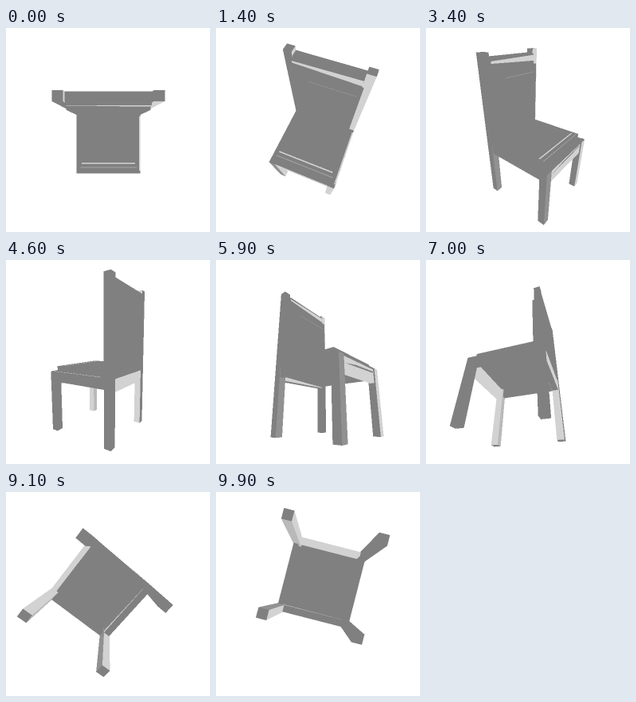
These frames come from a looping animation (256 by 256 pixels, 10000 ms). An HTML page with a canvas:

```html
<!DOCTYPE html>
<html lang="en">
<head>
<meta charset="utf-8">
<title>Chair orbit</title>
<style>
html, body { margin: 0; width: 100%; height: 100%; overflow: hidden; background: #fff; }
canvas { display: block; width: 100vw; height: 100vh; }
</style>
</head>
<body>
<canvas id="view" width="256" height="256"></canvas>
<script>
const SIZE = 256, SS = 2, W = SIZE * SS;
const STEPS = 100, STEP_MS = 100, TURNS = 4;
const DIST = 2.5, FOCAL = SIZE / 2 / Math.tan(Math.PI / 6);
const DARK = 128, SOFT = 145, MID = 185, LIGHT = 210;

const ctx = document.getElementById("view").getContext("2d");
const buffer = document.createElement("canvas");
buffer.width = buffer.height = W;
const bctx = buffer.getContext("2d");
const image = bctx.createImageData(W, W);
const pixels = new Uint32Array(image.data.buffer);
const depth = new Float32Array(W * W);

// Chair axes: x right, y up, z towards the front edge of the seat
const quads = [];
const quad = (tone, ...points) => quads.push({ tone, points });

function box([x0, x1], [y0, y1], [z0, z1], tones = {}) {
  const { left = DARK, right = DARK, top = DARK, bottom = DARK, front = DARK, rear = DARK } = tones;
  quad(left, [x0, y0, z0], [x0, y0, z1], [x0, y1, z1], [x0, y1, z0]);
  quad(right, [x1, y0, z0], [x1, y0, z1], [x1, y1, z1], [x1, y1, z0]);
  quad(bottom, [x0, y0, z0], [x1, y0, z0], [x1, y0, z1], [x0, y0, z1]);
  quad(top, [x0, y1, z0], [x1, y1, z0], [x1, y1, z1], [x0, y1, z1]);
  quad(rear, [x0, y0, z0], [x1, y0, z0], [x1, y1, z0], [x0, y1, z0]);
  quad(front, [x0, y0, z1], [x1, y0, z1], [x1, y1, z1], [x0, y1, z1]);
}

function strip(tone, [x0, x1], y, [z0, z1]) {
  quad(tone, [x0, y, z0], [x1, y, z0], [x1, y, z1], [x0, y, z1]);
}

function buildChair() {
  const left = [-0.474, -0.38], right = [0.38, 0.474];
  const inner = [-0.38, 0.38];
  const back = [-0.333, -0.24], fore = [0.552, 0.648];
  const foot = -0.97, knee = -0.13, tip = 1.02;

  // Legs and back posts
  box(left, [foot, knee], back, { right: LIGHT, front: SOFT });
  box(left, [knee, tip], back, { right: LIGHT });
  box(left, [foot, knee], fore, { right: LIGHT, front: SOFT, rear: MID });
  box(right, [foot, knee], back);
  box(right, [knee, tip], back, { front: LIGHT });
  box(right, [foot, knee], fore, { front: LIGHT });

  // Rails under the seat
  box(inner, [-0.32, -0.14], [0.58, 0.63], { front: LIGHT, rear: LIGHT, bottom: LIGHT });
  quad(DARK, [-0.34, -0.215, 0.632], [0.36, -0.19, 0.632], [0.36, -0.17, 0.632], [-0.1, -0.185, 0.632]);
  box(inner, [-0.3, -0.14], [-0.325, -0.24], { rear: LIGHT });
  quad(LIGHT, [-0.38, -0.3, -0.238], [0.38, -0.3, -0.238], [0.38, -0.29, -0.238], [-0.38, -0.25, -0.238]);
  box([-0.465, -0.41], [-0.262, -0.125], [-0.24, 0.552]);
  box([0.41, 0.465], [-0.262, -0.125], [-0.24, 0.552]);

  // Seat and cushion
  box([-0.472, 0.472], [-0.14, -0.122], [-0.24, 0.642]);
  box([-0.43, 0.43], [-0.122, -0.05], [-0.2, 0.56]);
  strip(LIGHT, [-0.385, 0.385], -0.048, [0.47, 0.487]);
  strip(165, [-0.4, 0.41], -0.048, [0.535, 0.545]);
  strip(LIGHT, [0.455, 0.47], -0.12, [-0.2, 0.6]);

  // Backrest
  box([-0.39, 0.39], [-0.14, 0.97], [-0.333, -0.25]);
  box([-0.4, 0.4], [-0.05, 0.83], [-0.26, -0.19]);
  box(inner, [0.82, 0.96], [-0.32, -0.22]);
  quad(LIGHT, [-0.38, 0.905, -0.217], [0.38, 0.87, -0.217], [0.38, 0.945, -0.217], [-0.38, 0.93, -0.217]);
  quad(155, [-0.2, 0.722, -0.188], [0.36, 0.722, -0.188], [0.36, 0.73, -0.188], [-0.2, 0.73, -0.188]);
}

function camera(step) {
  const last = STEPS - 1;
  const lift = Math.PI * (0.5 - step / last);
  let turn = Math.PI - 2 * Math.PI * TURNS * step / STEPS;
  if (step === 0 || step === last) turn += Math.PI; // the view flips at the poles
  const c = Math.cos(lift), s = Math.sin(lift);
  const ct = Math.cos(turn), st = Math.sin(turn);
  return ([x, y, z]) => {
    const u = x * ct + z * st;
    const h = z * ct - x * st;
    const near = 1 / (DIST - h * c - y * s);
    return {
      x: (128.5 + FOCAL * u * near) * SS,
      y: (128 - FOCAL * (y * c - h * s) * near) * SS,
      near
    };
  };
}

function fillTriangle(a, b, c, color) {
  const area = (b.x - a.x) * (c.y - a.y) - (b.y - a.y) * (c.x - a.x);
  if (Math.abs(area) < 1e-6) return;
  const clamp = v => Math.max(0, Math.min(W - 1, v));
  const x0 = clamp(Math.floor(Math.min(a.x, b.x, c.x)));
  const x1 = clamp(Math.ceil(Math.max(a.x, b.x, c.x)));
  const y0 = clamp(Math.floor(Math.min(a.y, b.y, c.y)));
  const y1 = clamp(Math.ceil(Math.max(a.y, b.y, c.y)));
  for (let y = y0; y <= y1; y++) {
    for (let x = x0; x <= x1; x++) {
      const px = x + 0.5, py = y + 0.5;
      const wb = ((px - a.x) * (c.y - a.y) - (py - a.y) * (c.x - a.x)) / area;
      const wc = ((b.x - a.x) * (py - a.y) - (b.y - a.y) * (px - a.x)) / area;
      const wa = 1 - wb - wc;
      if (wa < 0 || wb < 0 || wc < 0) continue;
      const near = wa * a.near + wb * b.near + wc * c.near;
      const i = y * W + x;
      if (near > depth[i]) {
        depth[i] = near;
        pixels[i] = color;
      }
    }
  }
}

function draw(step) {
  const project = camera(step);
  depth.fill(0);
  pixels.fill(0xffffffff);
  for (const { tone, points } of quads) {
    const [a, b, c, d] = points.map(project);
    const color = (0xff000000 | tone << 16 | tone << 8 | tone) >>> 0;
    fillTriangle(a, b, c, color);
    fillTriangle(a, c, d, color);
  }
  bctx.putImageData(image, 0, 0);
  ctx.imageSmoothingQuality = "high";
  ctx.drawImage(buffer, 0, 0, SIZE, SIZE);
}

let shown = -1;
const start = performance.now();

function tick() {
  const step = Math.floor((performance.now() - start) / STEP_MS) % STEPS;
  if (step !== shown) {
    shown = step;
    draw(step);
  }
  requestAnimationFrame(tick);
}

buildChair();
tick();
</script>
</body>
</html>
```
